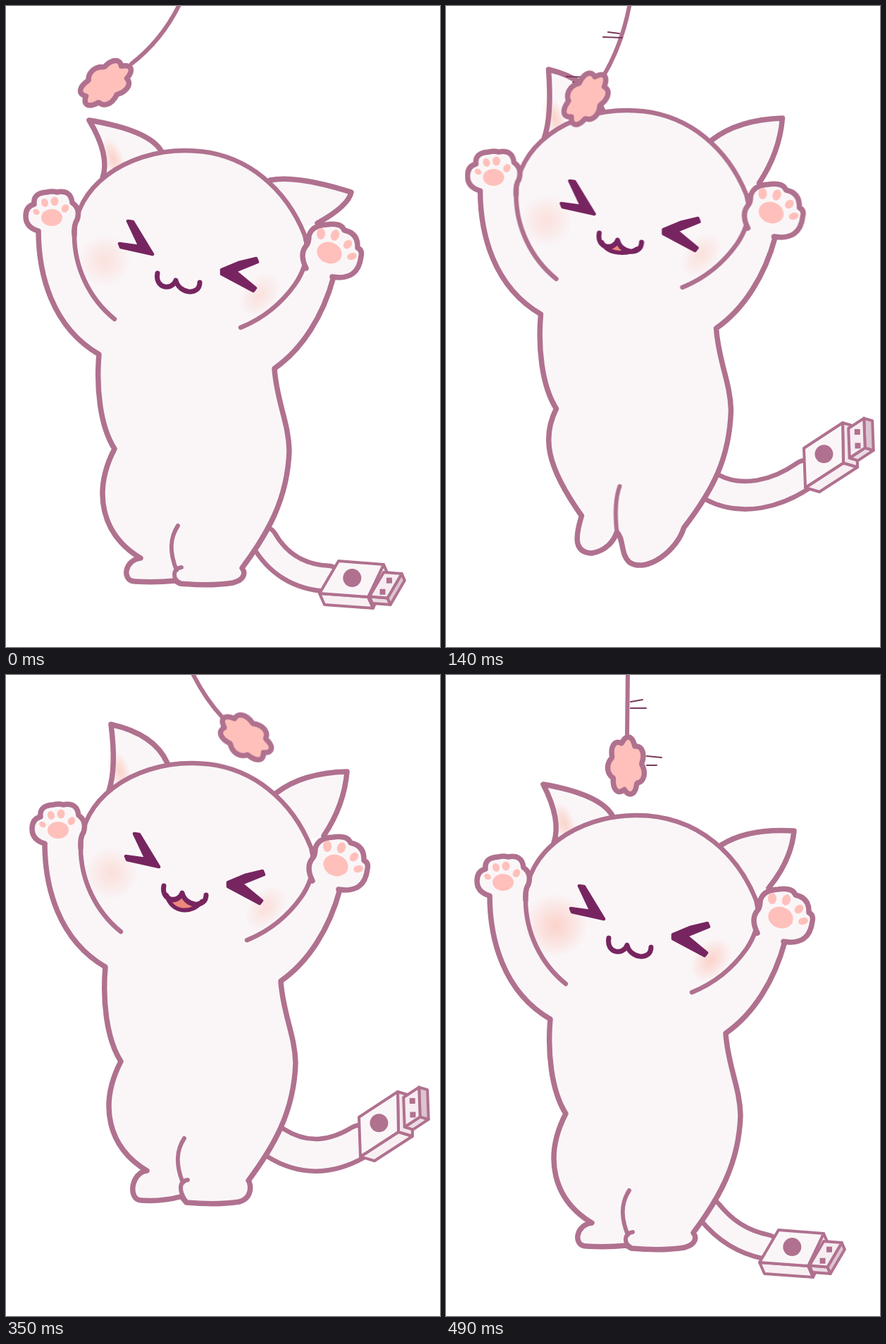
Animation, 616 px wide and 909 px high, one loop 0.56 s. Source, as an HTML page:

```html
<!DOCTYPE html>
<html lang="en">
<head>
<meta charset="utf-8">
<title>Cat reaching for a toy</title>
<style>
  html, body { margin: 0; width: 100%; height: 100%; overflow: hidden; background: #fff; }
  svg { display: block; width: 100vw; height: 100vh; }
</style>
</head>
<body>
<svg viewBox="0 0 616 909">
  <defs>
    <radialGradient id="blush">
      <stop offset="0" stop-color="#fbd3cb"/>
      <stop offset=".45" stop-color="#fbd3cb" stop-opacity=".6"/>
      <stop offset="1" stop-color="#fbd3cb" stop-opacity="0"/>
    </radialGradient>
  </defs>
  <g id="scene" fill="none" stroke-linecap="round" stroke-linejoin="round"></g>
</svg>
<script>
const LINE = '#b0718f', FUR = '#faf6f8', PINK = '#ffc0bb', DARK = '#772560', TONGUE = '#ec897b';
const STEP = 70;
const scene = document.getElementById('scene');

const path = (d, stroke = LINE, width = 7.5, fill = 'none') =>
  `<path d="${d}" stroke="${stroke}" stroke-width="${width}" fill="${fill}"/>`;
const fur = d => path(d, 'none', 0, FUR);
const oval = (x, y, rx, ry, turn = 0, fill = PINK) =>
  `<ellipse cx="${x}" cy="${y}" rx="${rx}" ry="${ry}" transform="rotate(${turn} ${x} ${y})" fill="${fill}"/>`;
const polygon = (points, width, fill) => path('M' + points.join('L') + 'Z', LINE, width, fill);

// Leg outlines run from the left hip to the right hip; inner holds the crease lines.
const standing = drop => ({
  outline: `C122 690 136 750 191 783C169 785 163 ${815 + drop} 183 ${816 + drop}
    Q212 ${818 + drop} 240 ${815 + drop / 2}L247 ${819 + drop}Q290 ${823 + drop} 322 ${818 + drop}
    C341 ${813 + drop} 339 802 335 797C370 750 400 700 402 630`,
  inner: `M244 737C232 755 232 775 242 800M249 796C236 798 236 812 247 ${818 + drop}`
});
const dangling = {
  outline: `C134 668 139 708 190 780C180 812 180 832 204 833C225 830 236 815 240 803
    C250 812 245 835 258 846C283 862 326 828 335 797C375 745 400 700 402 630`,
  inner: 'M244 738C236 760 238 785 240 803'
};
const stretched = {
  outline: `C140 690 155 735 190 783C198 805 182 820 189 833C203 853 228 840 238 812
    Q245 790 254 808C262 835 272 853 287 853C308 850 320 805 342 784C375 740 400 700 402 630`,
  inner: 'M252 725C241 750 245 775 250 800'
};

// Plug corners: a, b on the cable side, d, c on the tip side; depth is the visible thickness.
const plugFlat = { a: [472, 787], b: [445, 833], c: [514, 838], d: [536, 792], depth: [7, 16] };
const plugTilted = { a: [501, 627], b: [503, 683], c: [557, 648], d: [556, 591], depth: [20, 6] };
const plugUp = { a: [432, 578], b: [490, 590], c: [481, 517], d: [421, 512], depth: [12, -8] };

// A mouth value is the depth of the lower lip; zero keeps it closed.
const poses = [
  { body: [0, 0], ears: [118, 162, 490, 264], legs: standing(0), mouth: 0, blush: .6,
    tail: 'M366 757C385 790 415 810 457 812', girth: 43, plug: plugFlat, shift: [0, 0],
    toy: [142, 110, 53], string: 'M247 -4Q222 48 178 82', dashes: '' },
  { body: [1, -28], ears: [129, 155, 482, 240], legs: standing(8), mouth: 0, blush: .6,
    tail: 'M370 728C392 755 430 765 483 760', girth: 45, plug: plugFlat, shift: [30, -62],
    toy: [168, 122, 45], string: 'M254 -4Q234 52 200 92', dashes: '' },
  { body: [2.5, -57], ears: [143, 147, 475, 216], legs: dangling, mouth: 410, blush: .6,
    tail: 'M377 682C420 705 470 692 510 664', girth: 46, plug: plugTilted, shift: [7, 0],
    toy: [199, 131, 34], string: 'M261 -4Q250 55 223 100',
    dashes: 'M230 37L246 39M223 44L250 45M171 100L200 101M180 108L200 112' },
  { body: [2.5, -86], ears: [162, 144, 462, 203], legs: stretched, mouth: 424, blush: .75,
    tail: 'M368 669C430 690 472 670 467 586', girth: 47, plug: plugUp, shift: [0, 0],
    toy: [253, 124, 0], string: 'M263 -4Q261 45 256 86', dashes: '' },
  { body: [6, -100], ears: [153, 146, 468, 208], legs: stretched, mouth: 424, blush: .75,
    tail: 'M372 655C434 676 476 656 471 572', girth: 47, plug: plugUp, shift: [4, -14],
    toy: [301, 110, -28], string: 'M264 -4Q269 40 284 78', dashes: '' },
  { body: [9, -80], ears: [140, 150, 475, 217], legs: standing(9), mouth: 419, blush: .65,
    tail: 'M382 663C425 690 465 684 503 661', girth: 52, plug: plugTilted, shift: [0, 0],
    toy: [340, 88, -54], string: 'M264 -4Q282 33 308 61', dashes: '' },
  { body: [11, -39], ears: [141, 147, 472, 218], legs: standing(3), mouth: 0, blush: .75,
    tail: 'M378 712C400 748 440 762 490 755', girth: 50, plug: plugFlat, shift: [33, -67],
    toy: [304, 125, -32], string: 'M262 -4Q268 50 284 88',
    dashes: 'M272 40L292 38M275 51L298 48M322 102L341 101M326 107L338 112' },
  { body: [16, -6], ears: [122, 161, 478, 227], legs: standing(0), mouth: 0, blush: 1,
    tail: 'M374 761C395 787 420 804 455 811', girth: 41, plug: plugFlat, shift: [0, 0],
    toy: [256, 129, 0], string: 'M258 -4L257 90',
    dashes: 'M262 38L279 35M262 47L284 47M285 115L306 117M285 128L299 128' }
];

function drawPlug({ a, b, c, d, depth }, shift) {
  // Steps u along the plug, v across it and w through its thickness, from corner a.
  const at = (u, v, w = 0) => [0, 1].map(i =>
    a[i] + u * (d[i] - a[i]) + v * (b[i] - a[i]) + w * depth[i]);
  const add = p => p.map((n, i) => n + depth[i]);
  const mA = at(1, .1, .4), mB = at(1, .85, .4), mC = at(1.4, .85, .4), mD = at(1.4, .1, .4);
  const [markX, markY] = at(.5, .47);
  const hole = v => {
    const [x, y] = at(1.22, v, .4);
    return `<rect x="${x - 4}" y="${y - 4}" width="8" height="8" fill="${LINE}"/>`;
  };
  return `<g transform="translate(${shift})">` +
    polygon([b, c, add(c), add(b)], 4, '#f8eff3') +
    polygon([d, c, add(c), add(d)], 4, '#f3e6ec') +
    polygon([a, b, c, d], 4, FUR) +
    polygon([mB, mC, at(1.4, .85, 1), at(1, .85, 1)], 4, '#eadce4') +
    polygon([mD, mC, at(1.4, .85, 1), at(1.4, .1, 1)], 4, '#dcc4d0') +
    polygon([mA, mB, mC, mD], 4, '#f6ecf1') + hole(.33) + hole(.68) +
    oval(markX, markY, 13, 13, 0, LINE) + '</g>';
}

function drawEars([lx, ly, rx, ry]) {
  const left = `M137 244Q148 212 ${lx} ${ly}Q202 ${ly + 14} 220 205`;
  const right = `M375 247Q412 ${.45 * ry + 121} ${rx} ${ry}Q${rx - 4} ${.4 * ry + 178} 442 308`;
  return fur(left) + oval(152, 216, 15, 32, -20, 'url(#blush)') + path(left) +
    fur(right + 'L400 320') + path(right);
}

function drawMouth(lip) {
  const tongue = `M219 392C224 404 237 400 241 389C246 407 262 408 269 401C256 ${lip} 226 ${lip} 219 392Z`;
  return (lip ? path(tongue, DARK, 6, TONGUE) : '') +
    path('M215 379C211 401 236 404 241 389C246 409 275 411 275 392', DARK, 7);
}

function drawBody({ body, ears, legs, mouth, blush }) {
  const torso = `M46 318C46 380 65 455 132 494C128 540 133 595 154 628${legs.outline}
    C401 590 384 560 381 514C420 487 450 440 465 384`;
  const head = `M154 444C118 415 97 370 97 325C97 258 168 205 255 205
    C345 205 400 265 424 325Q434 360 410 395Q380 437 333 456`;
  const leftPaw = `M46 319Q28 314 28 298Q28 284 40 281Q38 265 58 264Q66 262 72 264
    Q92 260 94 279Q106 287 101 303Q96 310 97 325`;
  const rightPaw = `M463 384Q500 390 504 355Q506 346 499 343Q500 322 480 318
    Q476 307 455 310Q434 311 430 326Q430 336 426 340Q416 352 426 372`;
  const eyes = `M173 305L180 306L208 352L163 342L161 337L190 341Z
    M355 358L357 363L325 376L354 400L351 404L306 380L306 374L330 364Z`;
  return `<g transform="translate(${body})">` + drawEars(ears) +
    fur(torso + 'L440 350L75 290') + path(torso) + fur(head) +
    `<g opacity="${blush}">` +
    oval(140, 361, 24 + 22 * blush, 24 + 22 * blush, 0, 'url(#blush)') +
    oval(360, 410, 24, 36, 40, 'url(#blush)') + '</g>' +
    path(head, LINE, 6.5) + path(legs.inner, LINE, 6) +
    path(eyes, DARK, 4.5, DARK) + drawMouth(mouth) +
    path(leftPaw, LINE, 7.5, FUR) + path(rightPaw, LINE, 7.5, FUR) +
    oval(65, 300, 15, 12) + oval(43, 292, 5, 4, 30) + oval(55, 279, 5, 6, -20) +
    oval(69, 277, 5.5, 6.5) + oval(84, 287, 5, 6, 30) +
    oval(459, 350, 18, 15, 20) + oval(447, 323, 6, 8) + oval(467, 325, 6, 8, 20) +
    oval(485, 338, 5.5, 7, 45) + oval(491, 355, 7, 5, -15) + '</g>';
}

function drawToy({ toy: [x, y, turn], string, dashes }) {
  const rim = Array.from({ length: 96 }, (_, i) => {
    const angle = i * Math.PI / 48;
    const puff = .86 + .2 * Math.abs(Math.sin(3.5 * angle + .3));
    return [(25 * puff * Math.cos(angle)).toFixed(1), (39 * puff * Math.sin(angle)).toFixed(1)];
  });
  return path(string, LINE, 6) + path(dashes, '#79395b', 2) +
    `<g transform="translate(${x} ${y}) rotate(${turn})">` + polygon(rim, 7.5, PINK) + '</g>';
}

const pictures = poses.map(pose =>
  path(pose.tail, LINE, pose.girth) + path(pose.tail, FUR, pose.girth - 13) +
  drawPlug(pose.plug, pose.shift) + drawBody(pose) + drawToy(pose));

let shown = -1;
function render() {
  const index = Math.floor(performance.now() / STEP) % pictures.length;
  if (index !== shown) scene.innerHTML = pictures[shown = index];
  requestAnimationFrame(render);
}
render();
</script>
</body>
</html>
```
